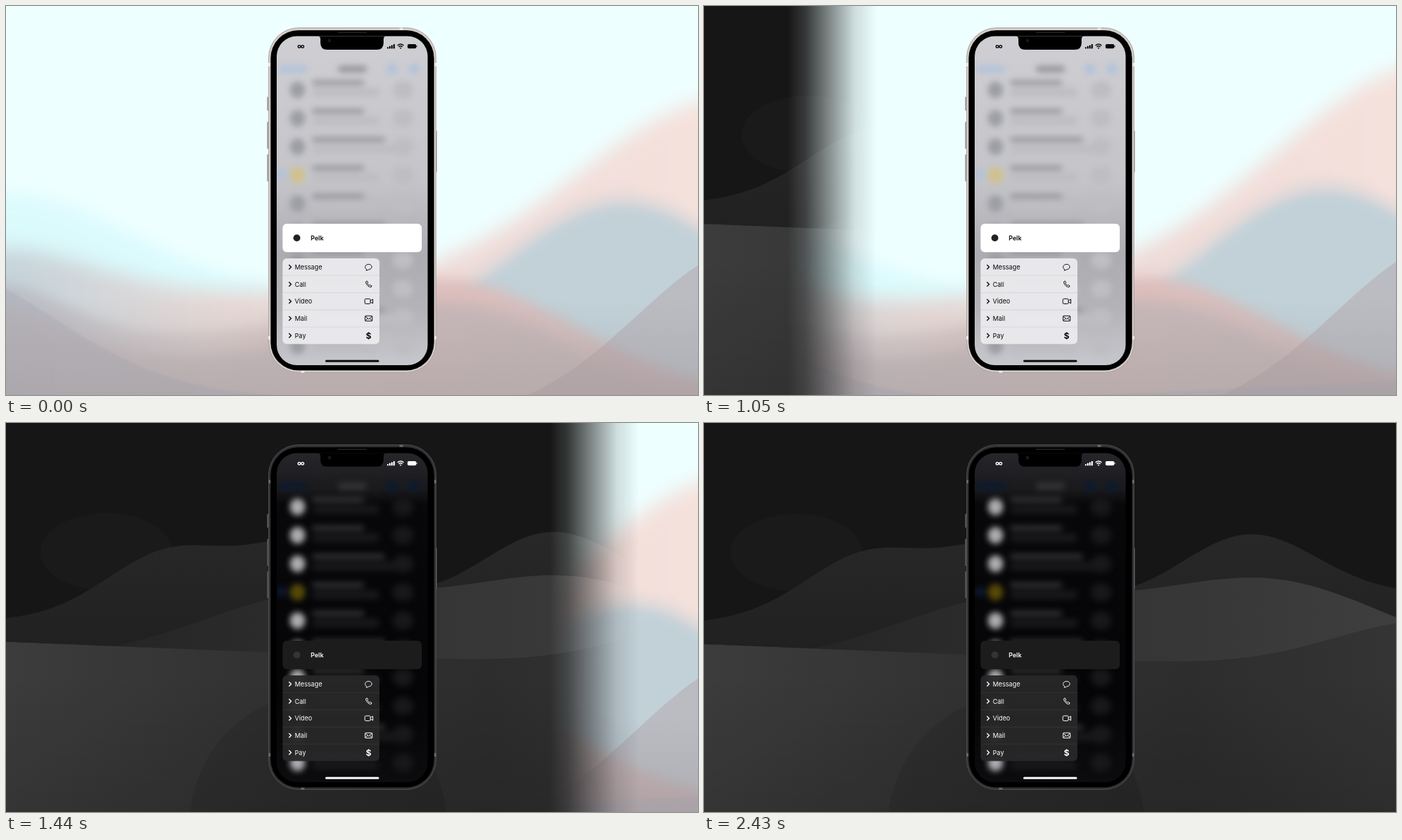
An HTML page that plays this animation: 997 by 561 pixels, repeating every 2.49 s.

```html
<!DOCTYPE html>
<html lang="en">
<head>
<meta charset="utf-8">
<title>Light to dark</title>
<style>
html, body { margin: 0; width: 100%; height: 100%; overflow: hidden; background: #eeffff; }
svg { position: absolute; left: 0; top: 0; width: 997px; height: 561px; }
text { font-family: Inter, Roboto, sans-serif; }
</style>
</head>
<body>
<script>
const W = 997, H = 561, LOOP = 2490;

// A ridge is a sloping base line raised by bell curves [centre, width, height].
function ridgePath({ base, tilt = 0, bumps, turn = 0 }, rise = 0) {
  let d = 'M-60 640';
  for (let x = -60; x <= W + 60; x += 8) {
    const u = x / W;
    let y = base + tilt * u + rise * turn * (50 - 110 * u);
    for (const [c, w, h] of bumps) y -= h * Math.exp(-(((x - c) / w) ** 2));
    d += `L${x} ${y.toFixed(2)}`;
  }
  return d + 'V640Z';
}

function gradient(id, down, ...stops) {
  const list = stops.map(([o, c]) => `<stop offset="${o}" stop-color="${c}"/>`).join('');
  return `<linearGradient id="${id}" gradientUnits="userSpaceOnUse" x2="${down ? 0 : W}" y2="${down ? H : 0}">${list}</linearGradient>`;
}

const rect = (x, y, w, h, r, fill, more = '') =>
  `<rect x="${x}" y="${y}" width="${w}" height="${h}" rx="${r}" fill="${fill}" ${more}/>`;
const cover = fill => rect(0, 0, W, H, 0, fill);
const circle = (x, y, r, fill) => `<circle cx="${x}" cy="${y}" r="${r}" fill="${fill}"/>`;
const oval = (x, y, rx, ry, fill, more = '') => `<ellipse cx="${x}" cy="${y}" rx="${rx}" ry="${ry}" fill="${fill}" ${more}/>`;
const label = (x, y, size, weight, fill, str, more = '') =>
  `<text x="${x}" y="${y}" font-size="${size}" font-weight="${weight}" fill="${fill}" ${more}>${str}</text>`;
const layer = r =>
  `<path d="${ridgePath(r)}" fill="${r.fill}" opacity="${r.opacity ?? 1}" style="filter:blur(${r.blur ?? .5}px)"/>`;
const repeat = (n, make) => Array.from({ length: n }, (_, i) => make(i)).join('');

const bubble = '<path d="M-3 3.2C-7 1-5-4 0-4S6.5 2 1 3.4C-.5 3.6-2 5-3.6 4.8Q-2.8 4-3 3.2Z"/>';
const handset = '<path d="M-4-3.5C-4.5 0 0 4.5 3.5 4.2L4.5 2.6 2 1 .8 1.8Q-1.2 .6-1.9-1.2L-1-2.3-2.4-4.6Z"/>';
const camera = '<rect x="-5.5" y="-3.6" width="8" height="7.2" rx="1.5"/><path d="M2.8-1 6-3V3L2.8 1"/>';
const letter = '<rect x="-5.2" y="-3.7" width="10.4" height="7.4" rx="1"/><path d="M-5-3.2 0 1 5-3.2M-5 3.3-1.5 0M5 3.3 1.5 0"/>';
const menu = [['Message', bubble], ['Call', handset], ['Video', camera], ['Mail', letter], ['Pay', '']];

function chatList(c) {
  const rows = repeat(10, i => {
    const y = 120 + 41 * i, w = 85 + 20 * Math.cos((i - 2) * 2.1);
    return oval(420, y + 1, 11, 12, i === 3 ? c.yellow : c.avatar) +
      rect(441, y - 13, w, 7, 3, c.name) + rect(441, y - 2, w + 22, 13, 6, c.sub) +
      oval(572, y + 1, 15, 13, c.sub);
  });
  const bar = (x, w, fill) => rect(x, 86, w, 10, 5, fill);
  return `<g style="filter:blur(4.5px)">${rows}${rect(390, 237, 15, 13, 5, c.blue)}
    ${bar(392, 42, c.blue)}${bar(478, 42, c.name)}${circle(556, 91, 8, c.blue)}${circle(588, 91, 8, c.blue)}</g>`;
}

function status(ink) {
  return label(425, 62, 11, 700, ink, '∞', 'text-anchor="middle"') +
    repeat(4, i => rect(549 + i * 3, 59.2 - i * 1.4, 2.2, 2.2 + i * 1.4, .6, ink)) +
    `<path d="M564 57Q568.5 53 573 57M565.8 59Q568.5 56.6 571.2 59" fill="none" stroke="${ink}" stroke-width="1.4"/>` +
    circle(568.5, 60.7, 1, ink) + rect(578.5, 55, 12.5, 6.2, 1.8, ink) + rect(591.4, 57, 1, 2.2, .5, ink);
}

function menuRow([name, icon], i, c) {
  const y = 376.5 + 24.7 * i;
  const line = i ? rect(398.5, y - 12.7, 139.5, .7, 0, c.line) : '';
  const mark = icon
    ? `<g transform="translate(522.5 ${y})" fill="none" stroke="${c.ink}" stroke-linejoin="round">${icon}</g>`
    : label(522.5, y + 4.2, 12, 700, c.ink, '$', 'text-anchor="middle"');
  return line + mark + label(416, y + 3.4, 9.2, 400, c.ink, name) +
    `<path d="M407.6 ${y - 3.2}l3.2 3.2-3.2 3.2" fill="none" stroke="${c.ink}" stroke-width="1.4"/>`;
}

function phone(c) {
  const button = (x, y, h) => rect(x, y, 3, h, 1, c.edge);
  const seams = repeat(4, i => rect(i % 2 ? 617 : 378, i < 2 ? 82 : 476, 3, 5, 0, c.seam));
  return `${button(376, 131, 20)}${button(376, 167, 39)}${button(376, 214, 39)}${button(618, 180, 60)}
    ${rect(378.5, 31.5, 241, 497, 43, c.frame, `stroke="${c.edge}"`)}${seams}
    ${rect(567, 31.5, 5, 3, 0, c.seam)}${rect(425, 526, 5, 3, 0, c.seam)}
    ${rect(381.3, 35, 235.4, 490.5, 40, '#000')}
    <clipPath id="${c.id}Clip">${rect(390, 43.5, 217.5, 474.5, 29, '#000')}</clipPath>
    <g clip-path="url(#${c.id}Clip)">${rect(390, 43, 218, 476, 0, `url(#${c.id}Screen)`)}${chatList(c)}
    <path d="M448 43H549Q544 43 544 48V53Q544 63 534 63H463Q453 63 453 53V48Q453 43 448 43" fill="#000"/></g>
    ${rect(478, 37, 42, 2, 1, '#1b1b1d')}${circle(466, 50, 2.4, '#18181c')}${status(c.ink)}
    ${rect(398.5, 314, 200.5, 41, 6, c.card)}${circle(419, 334.5, 5, c.logo)}
    ${label(439, 338, 9, 600, c.ink, 'Pelk')}
    ${rect(398.5, 364, 139.5, 123.5, 6, c.menu, 'fill-opacity=".95"')}
    ${menu.map((item, i) => menuRow(item, i, c)).join('')}
    ${rect(460, 510.5, 77.5, 3, 1.5, c.ink)}`;
}

const light = {
  id: 'light', frame: '#d3ccc8', edge: '#aaa4a2', seam: '#ebe6e3', ink: '#0a0a0a', card: '#fff', menu: '#ebeaee',
  line: '#d0cfd4', logo: '#222', avatar: '#9c9ea3', yellow: '#d0c18d', name: '#98989d', sub: '#bdbdc2', blue: '#b2c2da'
};
const dark = {
  id: 'dark', frame: '#303032', edge: '#515153', seam: '#666668', ink: '#fff', card: '#1c1c1d', menu: '#272728',
  line: '#39393a', logo: '#343435', avatar: '#acacb0', yellow: '#554908', name: '#343437', sub: '#18181b', blue: '#0b1a30'
};

// "turn" is how strongly a ridge sinks on the left and climbs on the right.
const hill = { base: 490, bumps: [[890, 235, 203]], turn: .5 };
const mauve = { base: 455, tilt: 100, bumps: [[0, 120, 55], [650, 240, 125]], turn: .2 };
const day = [
  { base: 415, bumps: [[0, 250, 145]], turn: .6, fill: '#cdf7fb', blur: 12, opacity: .55 },
  { base: 415, bumps: [[0, 180, 65], [1050, 320, 285]], turn: 1, fill: 'url(#blush)', blur: 14 },
  { ...hill, base: 472, fill: '#dcd8d9', blur: 9, opacity: .8 },
  { ...hill, fill: '#c2d1d8', blur: 7 },
  { ...mauve, fill: 'url(#mauve)', blur: 9 },
  { ...mauve, base: 487, fill: '#c0b5b7', blur: 10, opacity: .75 },
  { base: 600, bumps: [[1080, 240, 255]], turn: .1, fill: '#b1a1a6', opacity: .42 },
  { base: 565, bumps: [[-120, 260, 195]], turn: .5, fill: '#a3a8b4', blur: 1, opacity: .3 }
];
const night = [
  { base: 285, tilt: -40, bumps: [[240, 130, 92], [430, 110, 86], [785, 140, 96]], fill: 'url(#dune)' },
  { base: 340, bumps: [[430, 220, 85], [810, 240, 115]], fill: 'url(#slope)' },
  { base: 316, tilt: 40, bumps: [[1050, 200, 75]], fill: 'url(#front)' }
];

document.body.innerHTML = `
<svg viewBox="0 0 ${W} ${H}"><defs>
  ${gradient('blush', 0, [0, '#c5d4db'], [.3, '#e5d8d6'], [.63, '#eedbd8'], [1, '#f5e1dc'])}
  ${gradient('mauve', 0, [0, '#b9bec6'], [.28, '#d4c8c8'], [.63, '#debebc'], [.8, '#d3bdbc'], [1, '#c6b6b8'])}
  ${gradient('haze', 1, [.75, '#86828400'], [1, '#86828438'])}
  ${gradient('lightScreen', 1, [.08, '#cfcfd3'], [.45, '#c4c4c9'], [.64, '#adacb1'], [.78, '#b4b3b8'], [.92, '#c6c7cc'])}
  </defs>${cover('#eeffff')}<g id="day">${day.map(layer).join('')}</g>${cover('url(#haze)')}${phone(light)}
</svg>
<svg id="night" viewBox="0 0 ${W} ${H}"><defs>
  ${gradient('dune', 1, [.28, '#282828'], [.6, '#202020'])}
  ${gradient('slope', 0, [.13, '#242424'], [.4, '#2c2c2c'], [.65, '#363636'], [1, '#3e3e3e'])}
  ${gradient('front', 0, [0, '#3c3c3c'], [.4, '#313131'], [.7, '#2d2d2d'], [1, '#343434'])}
  ${gradient('dusk', 1, [.65, '#0000'], [1, '#0002'])}
  ${gradient('darkScreen', 1, [.08, '#26262a'], [.17, '#1a1a1d'], [.21, '#08080a'], [.7, '#050507'], [.92, '#0c0c0f'])}
  </defs>${cover('#161616')}<g id="cloud">${oval(143, 186, 95, 56, '#1a1a1a')}</g>
  <g id="dunes">${night.map(layer).join('')}${oval(450, 580, 185, 190, '#000', 'opacity=".1"')}</g>
  ${cover('url(#dusk)')}${phone(dark)}
</svg>`;

const find = id => document.getElementById(id);
const nightScene = find('night'), cloud = find('cloud'), dunes = find('dunes');
const dayPaths = [...find('day').children];

function draw(now) {
  const t = now % LOOP;
  const rise = 1 - Math.exp(-t / 700);
  day.forEach((r, i) => dayPaths[i].setAttribute('d', ridgePath(r, rise)));

  const drift = (t - 1560) / 870;
  cloud.setAttribute('transform', `translate(${-10 * drift} ${drift})`);
  dunes.setAttribute('transform', `translate(0 ${3 * drift})`);

  // Soft edge sweeping left to right.
  const x = 183 + 1.7 * (t - 1050);
  const mask = `linear-gradient(90deg, #000 ${x - 64}px, #000000d9 ${x - 38}px, #00000026 ${x + 32}px, #0000 ${x + 64}px)`;
  nightScene.style.webkitMaskImage = nightScene.style.maskImage = mask;
  nightScene.style.visibility = x > -64 ? 'visible' : 'hidden';
  requestAnimationFrame(draw);
}
requestAnimationFrame(draw);
</script>
</body>
</html>
```
